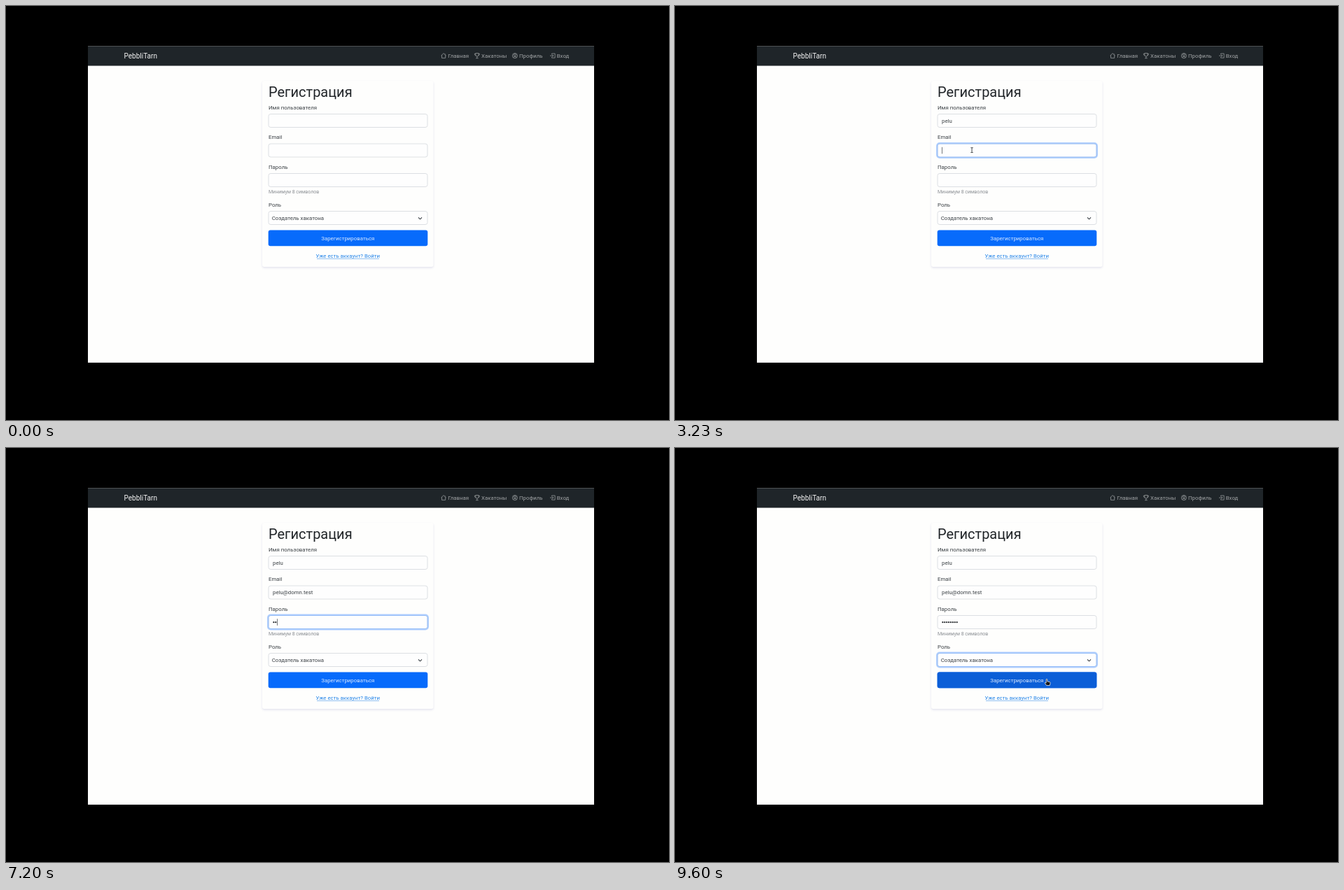
Animation of 947x592 px, one loop 9.63 s. Source, as an HTML page with a canvas:

```html
<!DOCTYPE html>
<html lang="ru">
<head>
<meta charset="utf-8">
<style>
  html, body { margin: 0; width: 100%; height: 100%; overflow: hidden; background: #000; }
  canvas { display: block; }
</style>
</head>
<body>
<canvas width="947" height="592"></canvas>
<script>
const ctx = document.querySelector('canvas').getContext('2d');
const LOOP = 9630, BODY = 7.85;
const LEFT = 375, WIDTH = 227;
const USER = 'pelu', MAIL = 'pelu@domn.test';

// Times at which characters are entered
const userKeys = [1600, 1770, 1930, 2100];
const mailKeys = [3450, 3700, 3900, 4130, ...Array.from({ length: 10 }, (_, i) => 4450 + i * 146)];
const passKeys = Array.from({ length: 8 }, (_, i) => 6900 + i * 175);

const fields = [
  { y: 154.5, from: 1100, to: 2850, keys: userKeys, value: USER },
  { y: 197, from: 2850, to: 6350, keys: mailKeys, value: MAIL },
  { y: 239.5, from: 6350, to: 8870, keys: passKeys, dots: true },
  { y: 293.5, from: 8870, to: LOOP }
];

// Pointer journeys: each point is [time, x, y]
const journeys = [
  { until: 1600, path: [[100, 625, 345], [900, 435, 162]] },
  { until: 3300, path: [[2330, 435, 162], [2500, 425, 162], [2800, 424, 206]] },
  { until: 6900, path: [[6070, 424, 206], [6300, 424, 246]] },
  { until: LOOP, path: [[8270, 424, 246], [8530, 593, 334], [8830, 585, 303], [9300, 585, 303], [9590, 531, 331]] }
];

const icons = {
  home: new Path2D('M1 8 8 1.3 15 8M3 6.5V14.5H13V6.5M12 5V2.5'),
  cup: new Path2D('M4 1H12V4C12 12 4 12 4 4ZM4 2.5H1C1 6 2.5 8 5 8M12 2.5H15C15 6 13.5 8 11 8M8 10V14M4.5 15H11.5'),
  person: new Path2D('M15 8A7 7 0 1 1 1 8A7 7 0 1 1 15 8M11 6A3 3 0 1 1 5 6A3 3 0 1 1 11 6M3 13C5 9.5 11 9.5 13 13'),
  enter: new Path2D('M6 4.5V2H15V14H6V11.5M1 8H10.5M7.5 5 10.5 8 7.5 11')
};
const arrow = new Path2D('M0 0V9L2.1 7 3.6 10.2 5 9.6 3.5 6.5H6.3Z');
const hand = new Path2D('M-.9 0C-.9-1 .8-1 .8 0V3L4.5 3.8C5.3 4 5.4 5 5.2 6L4.5 9H-.4L-2.7 5.5C-3 4.5-2 4.3-.9 5.3Z');

const clamp = v => Math.max(0, Math.min(1, v));
const ease = v => v * v * (3 - 2 * v);
const fade = (t, from, to) => clamp((t - from) / 150) * (1 - clamp((t - to) / 150));

function text(str, x, y, size = BODY, color = '#3b4045', align = 'left') {
  ctx.font = `${size}px Roboto, "Open Sans", sans-serif`;
  ctx.textAlign = align;
  ctx.fillStyle = color;
  ctx.fillText(str, x, y);
}

function box(x, y, w, h, r, fill, stroke, lineWidth = 1) {
  ctx.beginPath();
  ctx.roundRect(x, y, w, h, r);
  if (fill) { ctx.fillStyle = fill; ctx.fill(); }
  if (stroke) { ctx.strokeStyle = stroke; ctx.lineWidth = lineWidth; ctx.stroke(); }
}

function shape(path, x, y, scale, fill, stroke, lineWidth) {
  ctx.save();
  ctx.translate(x, y);
  ctx.scale(scale, scale);
  if (fill) { ctx.fillStyle = fill; ctx.fill(path); }
  ctx.strokeStyle = stroke;
  ctx.lineWidth = lineWidth;
  ctx.stroke(path);
  ctx.restore();
}

function drawNav() {
  ctx.fillStyle = '#1f2529';
  ctx.fillRect(117, 57.5, 723, 28);
  text('PebbliTarn', 168.5, 75, 10, '#f4f4f4');
  const items = [['home', 621, 'Главная'], ['cup', 668.8, 'Хакатоны'], ['person', 722.8, 'Профиль'], ['enter', 776.5, 'Вход']];
  for (const [icon, x, label] of items) {
    shape(icons[icon], x, 67, 0.51, null, '#a3a6a8', 1.4);
    text(label, x + 10.2, 74.3, BODY, '#a0a3a5');
  }
}

function drawCard() {
  ctx.save();
  ctx.shadowColor = 'rgba(70,70,150,.15)';
  ctx.shadowBlur = 3;
  ctx.shadowOffsetY = 1.5;
  box(366, 107, 244.5, 266, 3, '#fefefd');
  ctx.restore();
  text('Регистрация', LEFT, 130.3, 20, '#212529');
  text('Имя пользователя', LEFT, 147.8);
  text('Email', LEFT, 190.4);
  text('Пароль', LEFT, 232.8);
  text('Минимум 8 символов', LEFT, 267.5, 7, '#8b8f94');
  text('Роль', LEFT, 287);
}

function drawField({ y, from, to, keys, value, dots }, t) {
  const focus = fade(t, from, to);
  if (focus > 0) box(LEFT - 0.5, y - 0.5, WIDTH + 1, 20, 3.5, null, `rgba(80,150,255,${0.45 * focus})`, 3);
  box(LEFT, y, WIDTH, 19, 3, '#fefefe', '#d5d9de', 0.8);
  if (focus > 0) box(LEFT, y, WIDTH, 19, 3, null, `rgba(134,183,254,${focus})`, 0.8);
  if (!keys) return;

  const typed = keys.filter(k => k <= t);
  let caretX = 381.2;
  if (dots) {
    ctx.fillStyle = '#25292d';
    typed.forEach((_, i) => {
      ctx.beginPath();
      ctx.arc(382.4 + i * 2.9, y + 9.7, 1.1, 0, 7);
      ctx.fill();
    });
    caretX += typed.length * 2.9;
  } else {
    const shown = value.slice(0, typed.length);
    text(shown, 381, y + 12.4);
    caretX += ctx.measureText(shown).width;
  }
  const since = t - Math.max(from, ...typed);
  if (t >= from && t < to && since % 1000 < 500) {
    ctx.fillStyle = '#50555a';
    ctx.fillRect(caretX, y + 4.8, 0.8, 9.5);
  }
}

function drawActions(t) {
  text('Создатель хакатона', 379.7, 306.3);
  ctx.beginPath();
  ctx.moveTo(589, 302.3);
  ctx.lineTo(591.5, 304.8);
  ctx.lineTo(594, 302.3);
  ctx.strokeStyle = '#343a40';
  ctx.lineWidth = 1.1;
  ctx.stroke();

  const hover = Math.max(fade(t, 8500, 8640), fade(t, 9440, LOOP));
  box(LEFT - 0.3, 320.5, WIDTH + 0.6, 22.8, 3, '#076bfb');
  if (hover > 0) box(LEFT - 0.3, 320.5, WIDTH + 0.6, 22.8, 3, `rgba(11,94,215,${hover})`);
  text('Зарегистрироваться', 488.3, 334.8, BODY, '#d9e8ff', 'center');

  text('Уже есть аккаунт? Войти', 488.3, 360.2, 7.8, '#2585e8', 'center');
  ctx.fillStyle = '#65a8ee';
  ctx.fillRect(444, 361.2, 89, 0.7);
}

function drawSuggestion(t) {
  if (t < 1150 || t >= 2850) return;
  box(LEFT - 0.3, 174, WIDTH + 0.6, 24.6, 2, '#232226');
  text('Manage Passwords', 378.3, 189, 7.05, '#dedede');
}

function drawPointer(t) {
  const trip = journeys.find(j => t >= j.path[0][0] && t < j.until);
  if (!trip) return;
  const { path } = trip;
  const next = path.findIndex(p => p[0] > t);
  const [t1, x1, y1] = path[next < 0 ? path.length - 1 : next];
  const [t0, x0, y0] = next < 0 ? path.at(-1) : path[next - 1];
  const k = t1 > t0 ? ease((t - t0) / (t1 - t0)) : 1;
  const x = x0 + (x1 - x0) * k, y = y0 + (y1 - y0) * k;

  const inColumn = x > LEFT && x < LEFT + WIDTH;
  const inside = (top, height) => inColumn && y > top && y < top + height;
  if (fields.some(f => f.keys && inside(f.y, 19))) {
    ctx.fillStyle = '#33373b';
    ctx.fillRect(x - 0.4, y - 3.3, 0.9, 6.6);
    ctx.fillRect(x - 1.7, y - 3.7, 3.5, 0.8);
    ctx.fillRect(x - 1.7, y + 3, 3.5, 0.8);
  } else if (inside(320.5, 22.8)) {
    shape(hand, x, y, 0.95, '#17191d', '#f2f2f2', 0.8);
  } else {
    shape(arrow, x, y, 0.85, '#17191d', '#f2f2f2', 0.8);
  }
}

function draw(now) {
  const t = now % LOOP;
  ctx.fillStyle = '#000';
  ctx.fillRect(0, 0, 947, 592);
  ctx.fillStyle = '#fefefd';
  ctx.fillRect(117, 57.5, 723, 452.5);
  drawNav();
  drawCard();
  fields.forEach(f => drawField(f, t));
  drawActions(t);
  drawSuggestion(t);
  drawPointer(t);
}

const start = performance.now();
function tick() {
  draw(performance.now() - start);
  requestAnimationFrame(tick);
}
tick();
</script>
</body>
</html>
```
